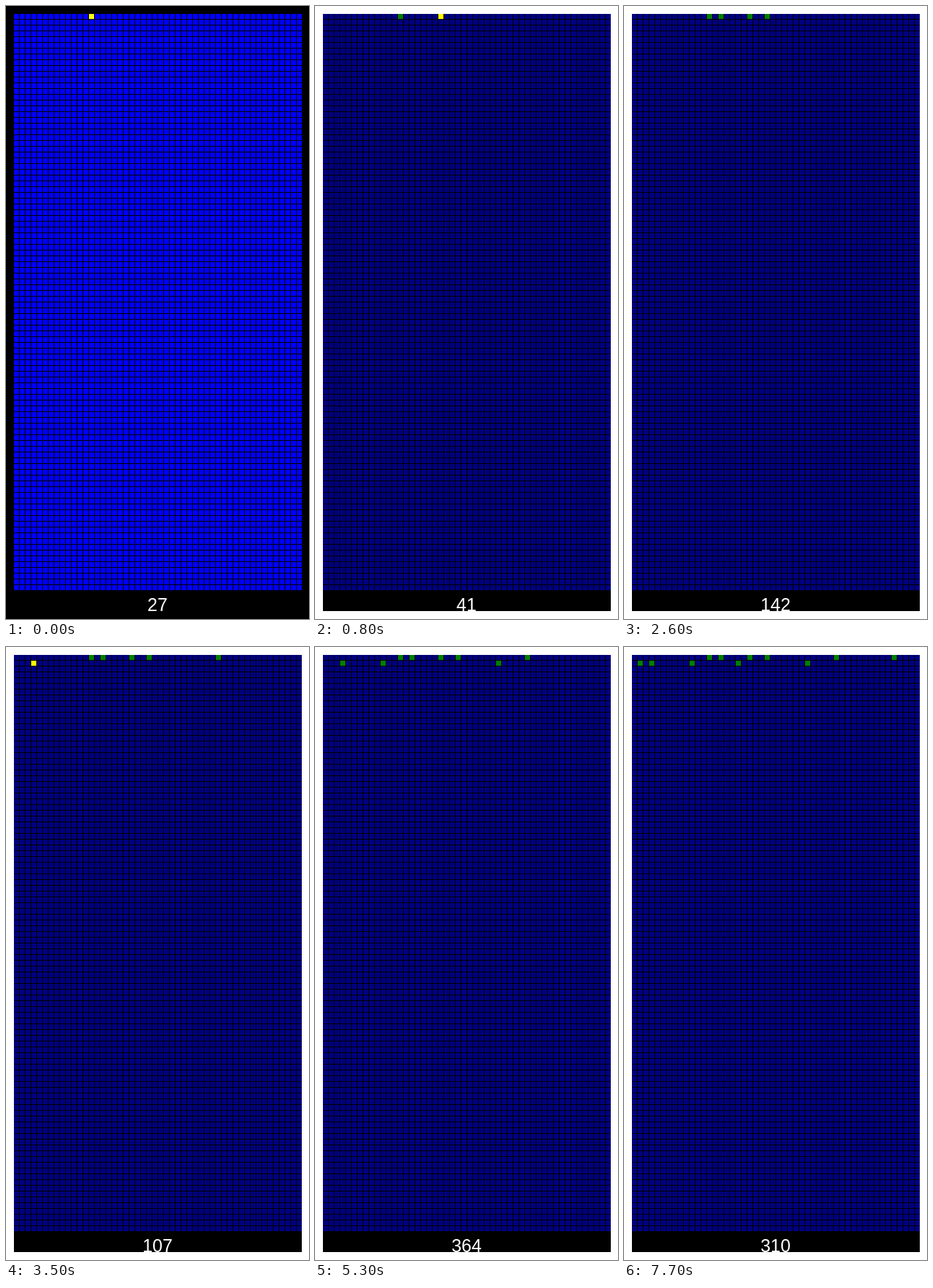
Write an HTML page with a canvas that moves like this. It is 420 by 850 pixels and loops after 8000 ms.

```html
<!DOCTYPE html>
<html lang="en">
<head>
<meta charset="utf-8">
<title>Hailstone sequence</title>
<style>
  html, body { margin: 0; height: 100%; overflow: hidden; background: #fff; }
  canvas { display: block; }
</style>
</head>
<body>
<canvas id="stage" width="420" height="850"></canvas>
<script>
const ctx = document.getElementById('stage').getContext('2d');
const COLS = 50, ROWS = 100, PITCH = 8, EDGE = 11;
const LOOP = 8000, FIRST = 500, STEP = 300, STEPS = 26;

// Collatz sequence from 27
const seq = [27];
while (seq.length < STEPS) {
  const n = seq[seq.length - 1];
  seq.push(n % 2 ? 3 * n + 1 : n / 2);
}

// Cell i stands for the odd number 2i + 1
function cell(i, color) {
  ctx.fillStyle = color;
  ctx.fillRect(EDGE + i % COLS * PITCH, EDGE + Math.floor(i / COLS) * PITCH, PITCH - 1, PITCH - 1);
}

function draw(step) {
  ctx.fillStyle = step ? '#fff' : '#000';
  ctx.fillRect(0, 0, 420, 850);
  ctx.fillStyle = '#000';
  ctx.fillRect(EDGE, EDGE, 399, 828);

  const blue = step < 2 ? '#00f' : '#000080';
  for (let i = 0; i < COLS * ROWS; i++) cell(i, blue);
  for (let k = 0; k <= step; k++) {
    if (seq[k] % 2) cell((seq[k] - 1) / 2, k === step ? '#ff0' : '#008000');
  }

  ctx.fillStyle = '#fff';
  ctx.font = '25px "Liberation Sans", Arial, sans-serif';
  ctx.textAlign = 'center';
  ctx.fillText(seq[step], 210, 839);
}

let shown = -1;
function tick() {
  const t = performance.now() % LOOP;
  const step = t < FIRST ? 0 : Math.min(STEPS - 1, 1 + Math.floor((t - FIRST) / STEP));
  if (step !== shown) draw(shown = step);
  requestAnimationFrame(tick);
}
tick();
</script>
</body>
</html>
```
